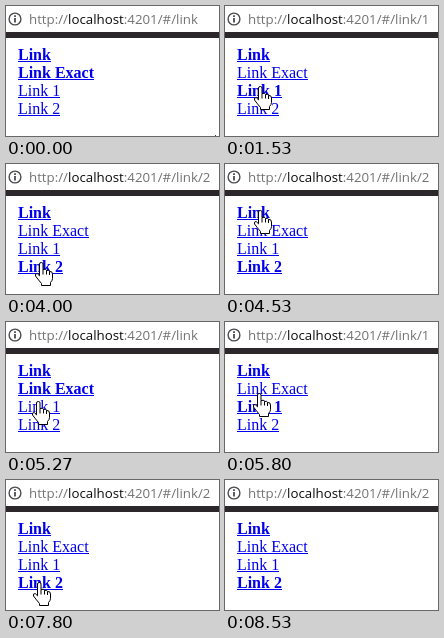
These frames come from a looping animation (213x130 px, 9.14 s). An HTML page:

```html
<!DOCTYPE html>
<html lang="en">
<head>
<meta charset="utf-8">
<title>Active links</title>
<style>
html, body { margin: 0; width: 100%; height: 100%; overflow: hidden; background: #fff; }
svg { display: block; }
.url { font: 13.3px "Open Sans", "Noto Sans", sans-serif; fill: #737373; }
.host { fill: #0c0c0d; }
.link { font: 16px "Liberation Serif", serif; fill: #00e; }
.link.active { font-weight: bold; }
.cursor { fill: #fff; stroke: #000; stroke-linejoin: round; }
</style>
</head>
<body>
<svg width="213" height="130" viewBox="0 0 213 130">
  <g fill="none" stroke="#4a4a4f">
    <circle cx="9" cy="13" r="5.900" stroke-width="1.400"/>
    <path d="M9 9.200v1.800M9 12v4.600" stroke-width="1.800"/>
  </g>
  <text class="url" x="23" y="18">http://<tspan class="host">localhost</tspan>:4201/#<tspan id="path"></tspan></text>
  <rect y="26" width="213" height="6" fill="#2b272b"/>
  <g id="links"></g>
  <path id="hand" class="cursor" d="M-1.500 2Q-1.500.5.3.5T2 2V7.500Q5 6.500 5.500 8.500Q8 7.500 8.500 9.500Q11.500 9 11.500 12V16.500Q11.500 18.500 9.500 20.500V23.500H.5V21.500Q-2.500 18-5.500 14Q-6.200 11.500-3.800 11.500L-1.500 13.800Z
    M2 7.500V12.500M5.500 8.500V12.500M8.500 9.500V13"/>
  <path id="arrow" class="cursor" d="M.5.5V16.200L4.200 12.700L6.600 18.300L8.800 17.300L6.500 11.900H11.500Z"/>
</svg>
<script>
const LOOP = 9140, STEP = 1000 / 15;
const $ = id => document.getElementById(id);

// [step, path]
const routes = [
  [0, "/link"], [23, "/link/1"], [42, "/link/2"], [72, "/link"],
  [84, "/link/1"], [102, "/link"], [117, "/link/2"]
];

// [first step, last step, x, y]: pointer travels to x, y during these steps
const moves = [
  [1, 1, 208, 129], [5, 6, 195, 129], [12, 17, 35, 80], [33, 36, 35, 102],
  [60, 65, 35, 43], [68, 68, 35, 46], [77, 80, 31, 85], [85, 87, 34, 71],
  [96, 100, 63, 68], [105, 110, 33, 102], [118, 122, 21, 124], [127, 128, 20, 140]
];

const NS = "http://www.w3.org/2000/svg";
function add(tag, attrs) {
  const el = document.createElementNS(NS, tag);
  for (const key in attrs) el.setAttribute(key, attrs[key]);
  return $("links").appendChild(el);
}

const links = [
  ["Link", url => true],
  ["Link Exact", url => url === "/link"],
  ["Link 1", url => url === "/link/1"],
  ["Link 2", url => url === "/link/2"]
].map(([label, isActive], i) => {
  const y = 54 + 18 * i;
  const text = add("text", { x: 12, y });
  text.textContent = label;
  const line = add("rect", { x: 12, y: y + 1, height: 1, fill: "#00e" });
  return { text, line, isActive };
});

function pointerAt(step) {
  let x = 209, y = 129;
  for (const [first, last, toX, toY] of moves) {
    if (step < first) break;
    const p = Math.min(1, (step - first + 1) / (last - first + 1));
    const ease = p * p * (3 - 2 * p);
    x += (toX - x) * ease;
    y += (toY - y) * ease;
  }
  return [Math.round(x), Math.round(y)];
}

let shownUrl;
function showUrl(url) {
  if (url === shownUrl) return;
  shownUrl = url;
  $("path").textContent = url;
  for (const { text, line, isActive } of links) {
    text.setAttribute("class", isActive(url) ? "link active" : "link");
    line.setAttribute("width", Math.round(text.getComputedTextLength()));
  }
}

function draw(now) {
  const step = Math.floor((now % LOOP + 4) / STEP);
  showUrl(routes.filter(([start]) => start <= step).pop()[1]);

  const [x, y] = pointerAt(step);
  const row = Math.floor((y - 40) / 18);
  const over = row >= 0 && row < 4 && x >= 12 &&
    x < 12 + Number(links[row].line.getAttribute("width"));
  for (const id of ["hand", "arrow"]) {
    $(id).setAttribute("transform", `translate(${x} ${y})`);
    $(id).style.display = (id === "hand") === over ? "" : "none";
  }
}

const start = performance.now();
function tick() {
  draw(performance.now() - start);
  requestAnimationFrame(tick);
}
tick();
</script>
</body>
</html>
```
